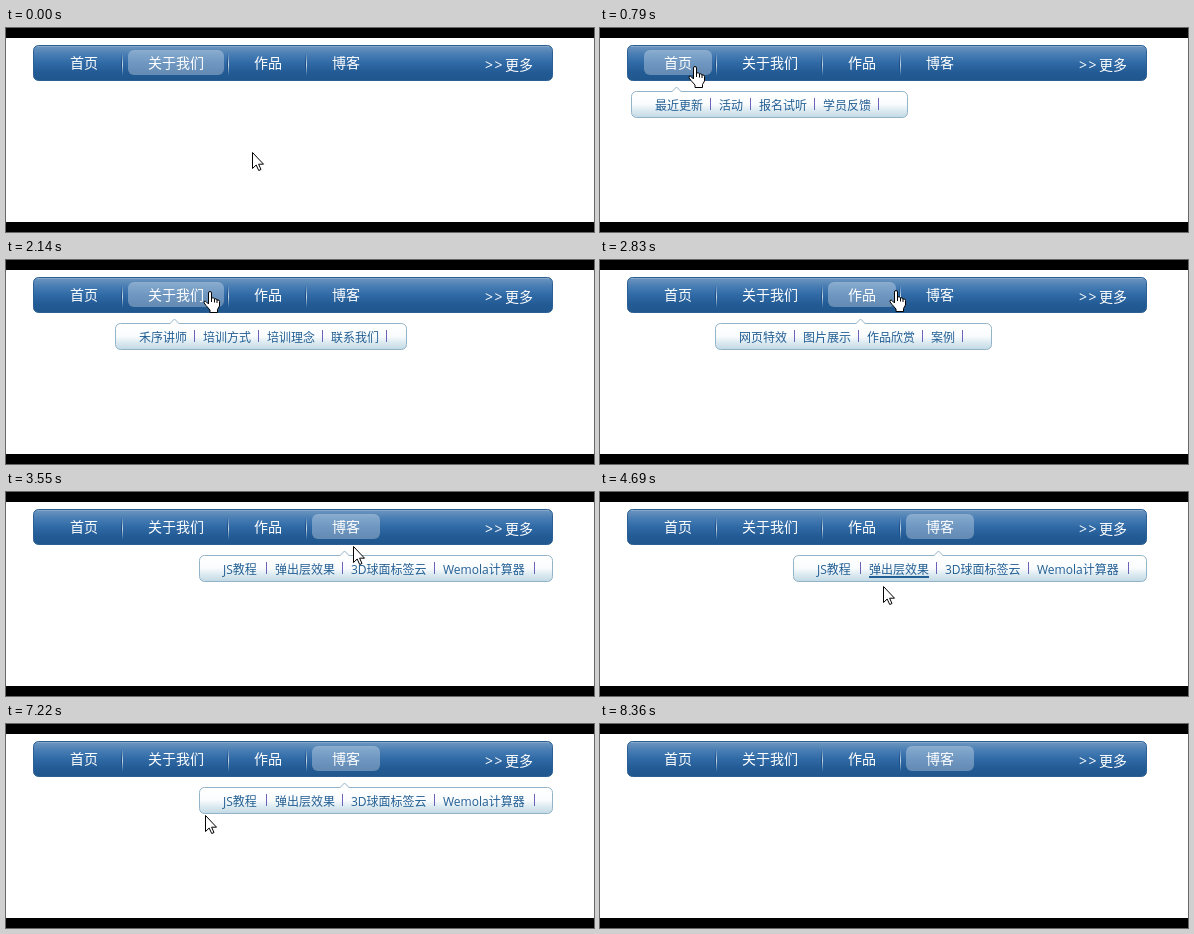
An HTML page with a canvas that plays this animation: 588 by 204 pixels, repeating every 8990 ms.

```html
<!DOCTYPE html>
<html lang="zh-CN">
<head>
<meta charset="utf-8">
<style>
  html, body { margin: 0; width: 100%; height: 100%; overflow: hidden; background: #fff; }
  canvas { display: block; }
</style>
</head>
<body>
<canvas id="stage" width="588" height="204"></canvas>
<script>
const ctx = document.getElementById('stage').getContext('2d');
const LOOP = 8990;
const POINTER_GONE = 8360;
const MENU_BOTTOM = 94;
const FONT = "'Open Sans', 'Noto Sans CJK SC', 'Noto Sans CJK', sans-serif";
const LINK_BLUE = '#235f94';

const tabs = [
  { label: '首页', left: 31, right: 308, links: ['最近更新', '活动', '报名试听', '学员反馈'] },
  { label: '关于我们', left: 109, right: 401, links: ['禾序讲师', '培训方式', '培训理念', '联系我们'] },
  { label: '作品', left: 115, right: 392, links: ['网页特效', '图片展示', '作品欣赏', '案例'] },
  { label: '博客', left: 193, right: 547, links: ['JS教程', '弹出层效果', '3D球面标签云', 'Wemola计算器'] }
];
let tabX = 44;
for (const tab of tabs) {
  tab.x = tabX;
  tab.w = tab.label.length * 14 + 40;
  tabX += tab.w + 10;
}

// The pointer rests at one place and glides to the next: start, end, place.
const onTab = (i, dx, y = 34) => ({ x: tabs[i].x + dx, y });
const home = { x: 246, y: 124 };
const link = { x: 327, y: 72 };
const corner = { x: 117, y: 98 };
const moves = [
  [0, 910, onTab(0, 42)],
  [1180, 1660, onTab(1, 44, 31)],
  [1960, 2410, onTab(2, 7, 31)],
  [2710, 3100, onTab(3, 69, 28)],
  [3430, 3700, link],
  [4070, 4310, onTab(3, 16, 29)],
  [4510, 4960, { x: 249, y: 149 }],
  [5330, 5720, onTab(3, 35)],
  [6090, 6240, { x: 323, y: 80 }],
  [6440, 6590, onTab(3, 28)],
  [6790, 7000, { x: 318, y: 80 }],
  [7000, 7490, corner],
  [8060, 8360, { x: 436, y: 194 }]
];

const arrow = new Path2D('M.5 .5V16.5L4.2 13L6.7 18.5L9 17.5L6.6 12.2H11.5Z');
const hand = new Path2D('M5.5 13V2Q5.5 .5 7 .5T8.5 2V7Q10.8 6 11.5 8' +
  'Q13.6 7 14 9Q16.5 8.4 16.5 10.5V15L14.5 18.5V21.5H7V19L3 14.5' +
  'Q.2 11.3 1 10.5Q2.2 9.5 3.5 11ZM8.5 7V11M11.5 8V11.5M14 9V12');

function pointerAt(t) {
  let { x, y } = home;
  for (const [start, end, place] of moves) {
    if (t < start) break;
    const u = Math.min(1, (t - start) / (end - start));
    const eased = 1 - (1 - u) ** 1.5;
    x += (place.x - x) * eased;
    y += (place.y - y) * eased;
  }
  return { x: Math.round(x), y: Math.round(y) };
}

function tabUnder({ x, y }) {
  return y > 53 ? -1 : tabs.findIndex(tab => x >= tab.x && x <= tab.x + tab.w + 1);
}

// Replays the hovering up to t: a tab opens its submenu, moving below closes it.
function menuAt(t) {
  let active = 1;
  let open = false;
  for (let s = 0; s <= t; s += 10) {
    const pointer = pointerAt(s);
    const hit = tabUnder(pointer);
    if (hit >= 0) {
      active = hit;
      open = true;
    } else if (pointer.y > MENU_BOTTOM) {
      open = false;
    }
  }
  return { active, open };
}

function gradient(top, bottom, ...colors) {
  const fill = ctx.createLinearGradient(0, top, 0, bottom);
  colors.forEach((color, i) => fill.addColorStop(i / (colors.length - 1), color));
  return fill;
}

function roundBox(x, y, w, h, radius, fill, stroke) {
  ctx.beginPath();
  ctx.roundRect(x, y, w, h, radius);
  ctx.fillStyle = fill;
  ctx.fill();
  if (stroke) {
    ctx.strokeStyle = stroke;
    ctx.stroke();
  }
}

function rect(x, y, w, h, fill) {
  ctx.fillStyle = fill;
  ctx.fillRect(x, y, w, h);
}

function text(label, x, y, font, color) {
  ctx.font = `${font} ${FONT}`;
  ctx.fillStyle = color;
  ctx.fillText(label, x, y);
}

function drawBar(active) {
  roundBox(27.5, 17.5, 519, 35, 5,
    gradient(17, 53, '#7399c0', '#497eb4', '#306aa6', '#235b95', '#1f568c'), '#2c6094');
  rect(31, 18, 512, 1, '#86a7ca');

  tabs.forEach((tab, i) => {
    if (i === active) roundBox(tab.x, 22, tab.w, 25, 6, 'rgba(255,255,255,.3)');
    text(tab.label, tab.x + 20, 40, '500 14px', '#fff');
    if (i === tabs.length - 1) return;
    const x = tab.x + tab.w + 3;
    rect(x, 25, 1, 23, gradient(25, 48, '#194a7d00', '#194a7d', '#194a7d00'));
    rect(x + 1, 25, 1, 23, gradient(25, 48, '#c4d8ea00', '#c4d8ea', '#c4d8ea00'));
  });

  ctx.letterSpacing = '1.6px';
  text('>>', 479, 42, '500 14px', '#fff');
  ctx.letterSpacing = '0px';
  text('更多', 499, 42, '500 14px', '#fff');
}

// Draws the open submenu and tells whether the pointer is on one of its links.
function drawSubmenu({ x: tabLeft, w, left, right, links }, pointer) {
  const tip = tabLeft + w / 2 - 1.5;
  roundBox(left + .5, 63.5, right - left - 1, 26, 5,
    gradient(63, 90, '#fff', '#fdfeff', '#f8fbfd', '#d9e8ef', '#bfd8e3'), '#93b4c8');

  ctx.beginPath();
  ctx.moveTo(tip - 5, 64);
  ctx.lineTo(tip, 59);
  ctx.lineTo(tip + 5, 64);
  ctx.fillStyle = '#fff';
  ctx.fill();
  ctx.stroke();

  let x = left + 24;
  let onLink = false;
  for (const label of links) {
    text(label, x, 82, '12px', LINK_BLUE);
    const width = Math.ceil(ctx.measureText(label).width / 4 - .01) * 4;
    rect(x + width + 7, 70, 1, 12, '#6a62b8');
    if (pointer.x >= x && pointer.x < x + width && pointer.y >= 68) {
      rect(x, 84, width, 2, LINK_BLUE);
      onLink = pointer.y < 90;
    }
    x += width + 16;
  }
  return onLink;
}

function drawPointer({ x, y }, onLink) {
  const shape = onLink ? hand : arrow;
  ctx.save();
  ctx.beginPath();
  ctx.rect(0, 10, 588, 184);
  ctx.clip();
  ctx.translate(onLink ? x - 6 : x, y);
  ctx.lineJoin = 'round';
  ctx.fillStyle = '#fff';
  ctx.strokeStyle = '#000';
  ctx.fill(shape);
  ctx.stroke(shape);
  ctx.restore();
}

function draw(t) {
  const pointer = pointerAt(t);
  const { active, open } = menuAt(t);
  rect(0, 0, 588, 204, '#000');
  rect(0, 10, 588, 184, '#fff');
  drawBar(active);
  const onLink = open && drawSubmenu(tabs[active], pointer);
  if (t < POINTER_GONE) drawPointer(pointer, onLink || tabUnder(pointer) >= 0);
}

const start = performance.now();
function frame() {
  draw((performance.now() - start) % LOOP);
  requestAnimationFrame(frame);
}
frame();
</script>
</body>
</html>
```
